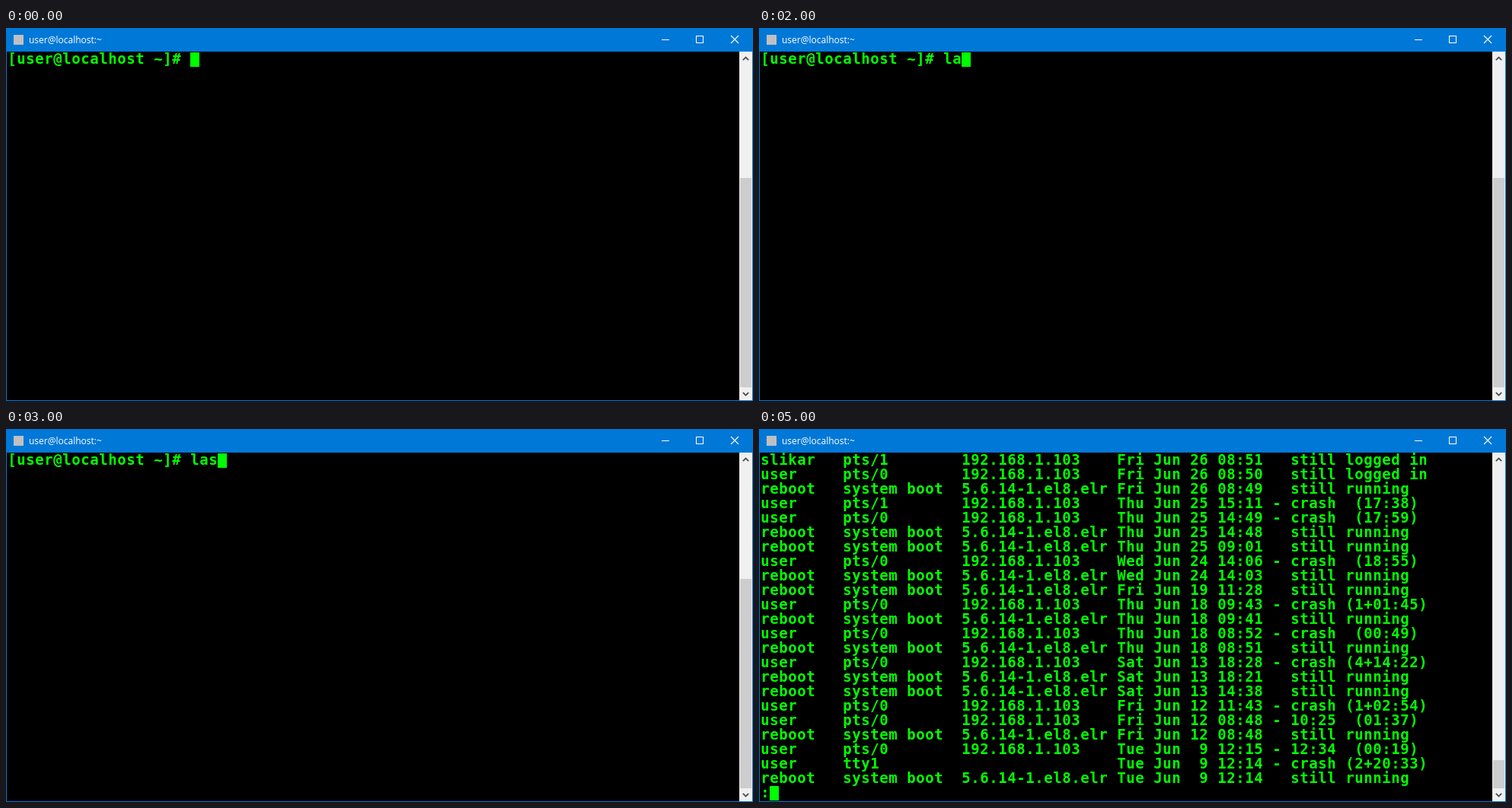
Write an HTML page with a canvas that moves like this. It is 981 px wide and 490 px high and loops after 6 s.

```html
<!DOCTYPE html>
<html lang="en">
<head>
<meta charset="utf-8">
<title>Terminal</title>
<style>
html, body { margin: 0; width: 100%; height: 100%; overflow: hidden; background: #000; }
canvas { display: block; }
</style>
</head>
<body>
<canvas id="stage" width="981" height="490"></canvas>
<script>
const ctx = document.getElementById("stage").getContext("2d");
const LOOP = 6000, STEP = 1000;
const CELL = { x: 2, y: 32, w: 12, h: 19 };
const BLUE = "#0078d7", GREEN = "#00ff00";
const PROMPT = "[user@localhost ~]# ", COMMAND = "last";

// Each entry: session kind, login time, status
const SESSIONS = {
  s: ["slikar", "pts/1", "192.168.1.103"],
  1: ["user", "pts/1", "192.168.1.103"],
  0: ["user", "pts/0", "192.168.1.103"],
  t: ["user", "tty1", ""],
  b: ["reboot", "system boot", "5.6.14-1.el8.elr"]
};
const LOG = `s|Fri Jun 26 08:51|  still logged in
0|Fri Jun 26 08:50|  still logged in
b|Fri Jun 26 08:49
1|Thu Jun 25 15:11|- crash  (17:38)
0|Thu Jun 25 14:49|- crash  (17:59)
b|Thu Jun 25 14:48
b|Thu Jun 25 09:01
0|Wed Jun 24 14:06|- crash  (18:55)
b|Wed Jun 24 14:03
b|Fri Jun 19 11:28
0|Thu Jun 18 09:43|- crash (1+01:45)
b|Thu Jun 18 09:41
0|Thu Jun 18 08:52|- crash  (00:49)
b|Thu Jun 18 08:51
0|Sat Jun 13 18:28|- crash (4+14:22)
b|Sat Jun 13 18:21
b|Sat Jun 13 14:38
0|Fri Jun 12 11:43|- crash (1+02:54)
0|Fri Jun 12 08:48|- 10:25  (01:37)
b|Fri Jun 12 08:48
0|Tue Jun  9 12:15|- 12:34  (00:19)
t|Tue Jun  9 12:14|- crash (2+20:33)
b|Tue Jun  9 12:14`.split("\n").map(formatEntry);

function formatEntry(entry) {
  const [kind, login, status = "  still running"] = entry.split("|");
  const [name, line, host] = SESSIONS[kind];
  return name.padEnd(9) + line.padEnd(13) + host.padEnd(17) + login + " " + status;
}

function rect(color, x, y, w, h) {
  ctx.fillStyle = color;
  ctx.fillRect(x, y, w, h);
}

function stroke(color, width, ...points) {
  ctx.strokeStyle = color;
  ctx.lineWidth = width;
  ctx.beginPath();
  points.forEach(([x, y]) => ctx.lineTo(x, y));
  ctx.stroke();
}

function drawLine(text, row) {
  ctx.fillStyle = GREEN;
  ctx.font = 'bold 19px "DejaVu Sans Mono", monospace';
  ctx.textAlign = "center";
  const y = CELL.y + row * CELL.h + 15;
  [...text].forEach((ch, col) => {
    if (ch !== " ") ctx.fillText(ch, CELL.x + (col + 0.5) * CELL.w, y);
  });
}

function drawCursor(col, row) {
  rect(GREEN, CELL.x + col * CELL.w, CELL.y + row * CELL.h, CELL.w, CELL.h);
}

function drawWindow() {
  rect(BLUE, 0, 0, 981, 490);
  rect("#000", 1, 31, 962, 458);
  rect("#c0c0c0", 10, 9, 13, 13);

  ctx.fillStyle = "#fff";
  ctx.font = '12px "Open Sans", sans-serif';
  ctx.textAlign = "left";
  ctx.fillText("user@localhost:~", 30, 20);

  rect("#fff", 861, 15, 10, 1);
  ctx.strokeStyle = "#fff";
  ctx.lineWidth = 1;
  ctx.strokeRect(906.5, 10.5, 9, 9);
  stroke("#fff", 1.1, [952, 10], [962, 20]);
  stroke("#fff", 1.1, [962, 10], [952, 20]);
}

function drawScrollbar(top) {
  rect("#f0f0f0", 963, 31, 17, 458);
  rect("#cdcdcd", 964, top, 15, 472 - top);
  stroke("#505050", 1.8, [967.8, 42.2], [971.5, 38.5], [975.2, 42.2]);
  stroke("#505050", 1.8, [967.8, 478.8], [971.5, 482.5], [975.2, 478.8]);
}

function draw(time) {
  const step = Math.floor((time % LOOP) / STEP);
  const listing = step > COMMAND.length;
  drawWindow();
  drawScrollbar(listing ? 435 : 197);
  if (listing) {
    LOG.forEach(drawLine);
    drawLine(":", LOG.length);
    drawCursor(1, LOG.length);
  } else {
    const text = PROMPT + COMMAND.slice(0, step);
    drawLine(text, 0);
    drawCursor(text.length, 0);
  }
}

const start = performance.now();
function tick() {
  draw(performance.now() - start);
  requestAnimationFrame(tick);
}
tick();
</script>
</body>
</html>
```
